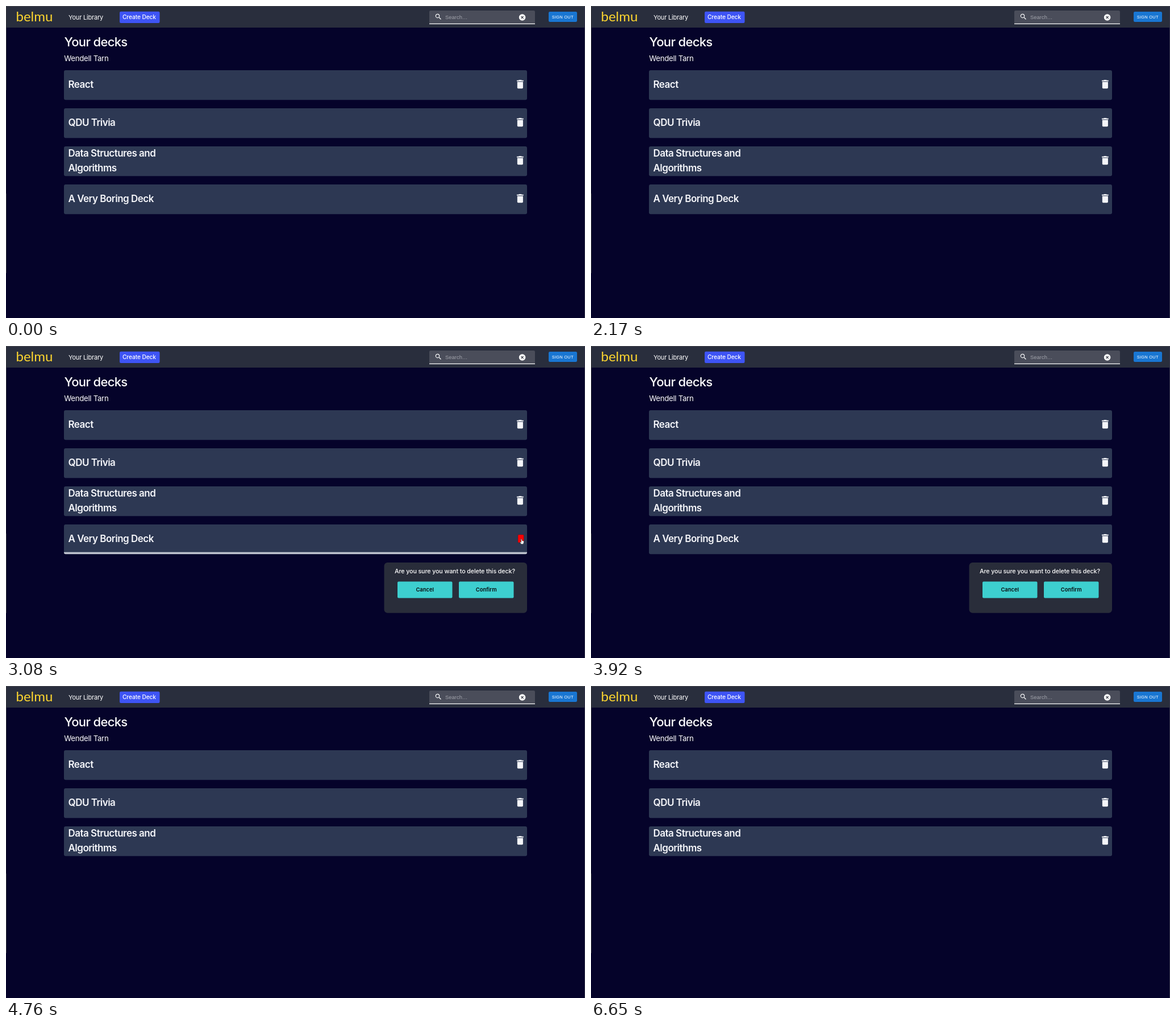
Recreate the animation shown at these times as an HTML page. Size 1019 px wide and 549 px high, loop 6.72 s.

```html
<!DOCTYPE html>
<html lang="en">
<head>
<meta charset="utf-8">
<title>Flashcard decks</title>
<style>
  html, body { margin: 0; width: 100%; height: 100%; overflow: hidden; background: #05032a; }
  svg { display: block; width: 100%; height: 100%; }
  text { font-family: Inter, sans-serif; fill: #fff; }
  .logo { font: 24px Lato, sans-serif; fill: #fdd62f; }
  .link { font-size: 11px; letter-spacing: -.018em; }
  .create { font-size: 10.2px; font-weight: 500; letter-spacing: -.01em; }
  .search { font: 9.3px "Liberation Sans", sans-serif; letter-spacing: .009em; fill: #a2a4ac; }
  .sign { font: 7.5px "Liberation Sans", sans-serif; letter-spacing: .029em; }
  .heading { font-size: 22px; font-weight: 500; letter-spacing: -.03em; }
  .owner { font-size: 13.2px; letter-spacing: -.022em; }
  .title { font-size: 17px; font-weight: 600; letter-spacing: -.03em; fill: #f5f6fa; }
  .question { font-size: 10.7px; font-weight: 500; letter-spacing: -.01em; }
  .action { font-size: 9.4px; font-weight: 600; fill: #08080c; text-anchor: middle; }
  .card { fill: #2d3853; }
  .button { fill: #3dcfcf; }
</style>
</head>
<body>
<svg viewBox="0 0 1019 549" preserveAspectRatio="none">
  <defs>
    <path id="trash" fill="#f5f6fa" transform="scale(.84)"
      d="M6 19c0 1.1.9 2 2 2h8c1.1 0 2-.9 2-2V7H6v12zM19 4h-3.5l-1-1h-5l-1 1H5v2h14V4z"/>
    <clipPath id="cardShape"><rect x="102" y="314" width="815" height="52.3" rx="3"/></clipPath>
  </defs>

  <rect width="1019" height="549" fill="#05032a"/>

  <g id="navbar">
    <rect width="1019" height="38" fill="#292e3d"/>
    <rect width="1019" height="1" fill="#46484f"/>
    <text class="logo" x="17.5" y="27">belmu</text>
    <text class="link" x="110" y="23.6">Your Library</text>
    <rect x="200" y="9.7" width="70.5" height="20.3" rx="2.3" fill="#3e54f5"/>
    <text class="create" x="205" y="23">Create Deck</text>
    <path d="M745 32V10.3q0-2.3 2.3-2.3h181.4q2.3 0 2.3 2.3V32z" fill="#4a4d5a"/>
    <rect x="745" y="30.8" width="186" height="1.2" fill="#fff"/>
    <path transform="translate(754 12) scale(.58)" fill="#fff"
      d="M15.5 14h-.8l-.3-.3A6.5 6.5 0 1 0 13.7 14.4l.3.3v.8l5 5 1.5-1.5zm-6 0a4.5 4.5 0 1 1 0-9 4.5 4.5 0 0 1 0 9z"/>
    <text class="search" x="773" y="22.5">Search…</text>
    <circle cx="908.6" cy="20" r="5.8" fill="#fff"/>
    <path d="M906.5 17.9l4.2 4.2m0-4.2l-4.2 4.2" stroke="#353845" stroke-width="1.3"/>
    <rect x="955" y="10" width="50" height="18" rx="2.3" fill="#1976d2"/>
    <text class="sign" x="960.8" y="21.7">SIGN OUT</text>
  </g>

  <rect width="1" height="470" fill="#34363c"/>
  <rect y="148" width="1" height="182" fill="#14142a"/>
  <rect x="1018" width="1" height="549" fill="#34344a"/>

  <text class="heading" x="102.5" y="70.8">Your decks</text>
  <text class="owner" x="102.3" y="97.3">Wendell Tarn</text>
  <g id="decks"></g>

  <g data-show="0 4760">
    <rect class="card" x="102" y="314" width="815" height="52.3" rx="3"/>
    <text class="title" x="109.5" y="344.8">A Very Boring Deck</text>
    <rect data-show="2380 3920" x="102" y="362.7" width="815" height="4" fill="#c0c4cf" clip-path="url(#cardShape)"/>
    <use data-show="0 2450 3500 6720" href="#trash" x="894.8" y="328.5"/>
    <rect data-show="2450 3500" x="901" y="332" width="10.3" height="14" rx="1.5" fill="#fb0000" stroke="#5c1024" stroke-width=".5"/>
  </g>

  <g data-show="3080 4760">
    <rect x="665.5" y="381" width="251.5" height="88.7" rx="6" fill="#292d3a"/>
    <text class="question" x="684" y="400.4">Are you sure you want to delete this deck?</text>
    <rect class="button" x="689" y="414.5" width="96.5" height="29" rx="2"/>
    <text class="action" x="737.2" y="432.4">Cancel</text>
    <rect class="button" x="797" y="414.5" width="96.5" height="29" rx="2"/>
    <rect data-show="4200 4760" x="797" y="414.5" width="97.3" height="29.5" rx="2" fill="#f00"/>
    <text id="confirm" class="action" x="845.2" y="432.4">Confirm</text>
  </g>

  <path data-show="3080 3500" fill="#fff" stroke="#222" stroke-width=".6"
    d="M906 339.6q1-.8 1.6.5l.6 2.2 2.3.6q1.3.3 1 1.8l-.5 2.2-.8 1.8h-3.5l-2-3q-.6-1.2.4-1.2l1.6.9z"/>
  <path data-show="5320 5390" fill="#000" stroke="#fff" stroke-width=".7"
    d="M848.5 425.5v9.5l2.2-2 1.6 3.6 1.5-.7-1.6-3.4h3z"/>
</svg>
<script>
  const LOOP = 6720;
  const decks = [["React"], ["QDU Trivia"], ["Data Structures and", "Algorithms"]];

  document.getElementById("decks").innerHTML = decks.map((lines, i) => {
    const top = 113 + 67 * i;
    const baseline = top + (lines.length > 1 ? 17.8 : 30.8);
    const title = lines.map((line, n) =>
      `<text class="title" x="109.5" y="${baseline + 26.3 * n}">${line}</text>`).join("");
    return `<rect class="card" x="102" y="${top}" width="815" height="52.3" rx="3"/>${title}
      <use href="#trash" x="894.8" y="${top + 14.5}"/>`;
  }).join("");

  const timed = [...document.querySelectorAll("[data-show]")].map(el =>
    ({ el, times: el.dataset.show.split(" ").map(Number) }));
  const confirmLabel = document.getElementById("confirm");

  function render(now) {
    const t = now % LOOP;
    for (const { el, times } of timed) {
      // An odd number of passed boundaries means the part is showing.
      const visible = times.filter(time => time <= t).length % 2 === 1;
      el.style.display = visible ? "" : "none";
    }
    confirmLabel.style.fill = t >= 4200 ? "#780505" : "";
  }

  const start = performance.now();
  function tick() {
    render(performance.now() - start);
    requestAnimationFrame(tick);
  }
  tick();
</script>
</body>
</html>
```
